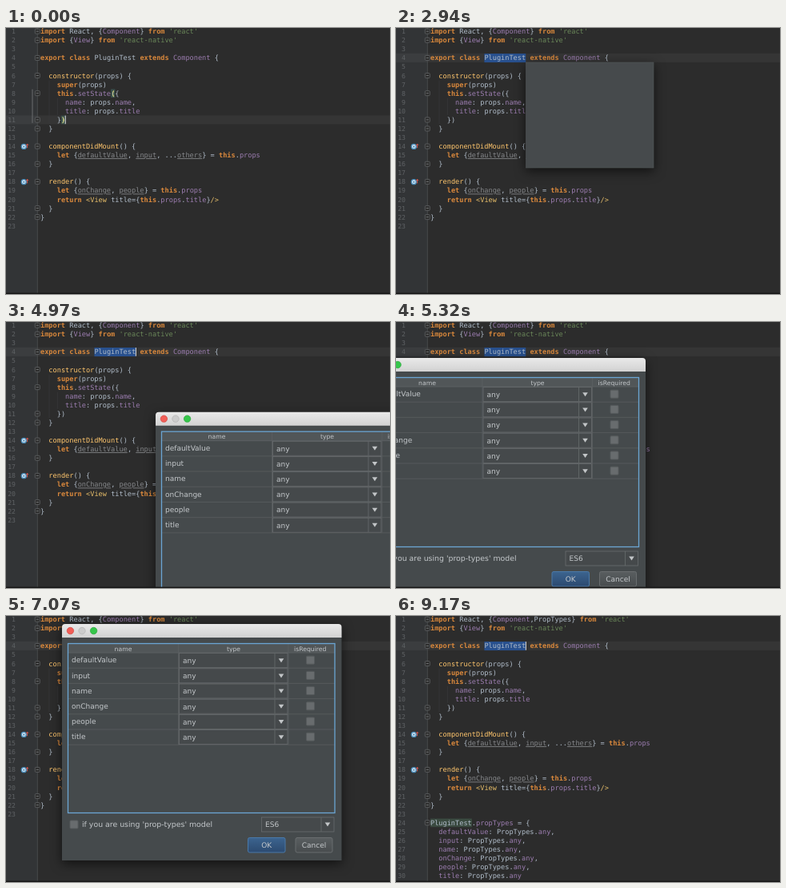
Animation of 480 by 333 pixels, one loop 9.24 s. Source, as an HTML page:

```html
<!DOCTYPE html>
<html lang="en">
<head>
<meta charset="utf-8">
<title>Editor plugin demo</title>
<style>
  html, body { margin: 0; width: 100%; height: 100%; overflow: hidden; background: #2c2c2c; }
  svg { display: block; width: 480px; height: 333px; }
  text { white-space: pre; text-rendering: geometricPrecision; }
  .code text { font: 8.61px "DejaVu Sans Mono", monospace; fill: #b0bcc9; }
  .code .num { font-size: 8.2px; fill: #5f6265; text-anchor: end; }
  .code .k { fill: #d9883c; font-weight: bold; }
  .code .p { fill: #9c7db0; }
  .code .f { fill: #ffc66d; }
  .code .s { fill: #6a8759; }
  .code .t { fill: #e8bf6a; }
  .code .u { fill: #85878a; text-decoration: underline; }
  .code .b { fill: #ffef28; font-weight: bold; }
  .ui text { font: 9px "DejaVu Sans", sans-serif; fill: #c3c7ca; }
  .ui .head { font-size: 7.7px; text-anchor: middle; }
  .ui .label { font-size: 9.37px; }
  .ui .btn { text-anchor: middle; }
  #popup, #dialog { filter: drop-shadow(0 4px 7px rgba(0, 0, 0, .6)); }
</style>
</head>
<body>
<svg id="stage" viewBox="0 0 480 333" xmlns="http://www.w3.org/2000/svg">
  <defs>
    <linearGradient id="bar" x2="0" y2="1"><stop stop-color="#e9e9e9"/><stop offset="1" stop-color="#d2d2d2"/></linearGradient>
    <linearGradient id="blue" x2="0" y2="1"><stop stop-color="#3c648f"/><stop offset="1" stop-color="#2c4a70"/></linearGradient>
    <linearGradient id="gray" x2="0" y2="1"><stop stop-color="#595e60"/><stop offset="1" stop-color="#484c4e"/></linearGradient>
  </defs>
</svg>
<script>
const LOOP = 9240, STEP = 70;
const CHAR = 5.185, LEFT = 43, LINE = 11.07;
const stage = document.getElementById('stage');
const midY = line => 4.2 + (line - 1) * LINE;
const colX = col => LEFT + col * CHAR;

function add(parent, tag, attrs, content) {
  const node = document.createElementNS('http://www.w3.org/2000/svg', tag);
  for (const key in attrs) node.setAttribute(key, attrs[key]);
  if (content !== undefined) node.textContent = content;
  return parent.appendChild(node);
}
const group = (parent, attrs = {}) => add(parent, 'g', attrs);
const rect = (parent, x, y, width, height, fill, more) =>
  add(parent, 'rect', { x, y, width, height, fill, ...more });
const path = (parent, d, stroke, more) =>
  add(parent, 'path', { d, stroke, fill: 'none', ...more });
const label = (parent, x, y, content, cls = '') =>
  add(parent, 'text', { x, y, class: cls }, content);
const show = (node, on) => { node.style.display = on ? '' : 'none'; };

// Code markup: [class|text] colours one token.
const tail = `[k|import] {[p|View]} [k|from] [s|'react-native']

[k|export class] PluginTest [k|extends] [p|Component] {

  [f|constructor](props) {
    [k|super](props)
    [k|this].[p|setState]({
      [p|name]: props.[p|name],
      [p|title]: props.[p|title]
    })
  }

  [f|componentDidMount]() {
    [k|let] {[u|defaultValue], [u|input], ...[u|others]} = [k|this].[p|props]
  }

  [f|render]() {
    [k|let] {[u|onChange], [u|people]} = [k|this].[p|props]
    [k|return] [t|<View] title={[k|this].[p|props].[p|title]}[t|/>]
  }
}
`.split('\n');
const firstLine = extra => `[k|import] React, {[p|Component]${extra}} [k|from] [s|'react']`;
const fields = ['defaultValue', 'input', 'name', 'onChange', 'people', 'title'];
const added = ['PluginTest.[p|propTypes] = {',
  ...fields.map((name, i) => `  [p|${name}]: PropTypes.[p|any]${i < 5 ? ',' : ''}`)];

function codeLine(parent, line, markup) {
  let col = 0;
  for (const [raw, cls, marked] of markup.matchAll(/\[(\w)\|(.*?)\]|[^\[]+/g)) {
    const content = marked ?? raw;
    const lead = content.length - content.trimStart().length;
    if (content.trim()) label(parent, colX(col + lead), midY(line) + 3, content.trim(), cls);
    col += content.length;
  }
}
function number(parent, line) {
  label(parent, 12, midY(line) + 3, line, 'num');
}
function fold(parent, line) {
  const y = midY(line);
  rect(parent, 36.3, y - 3, 6, 6, '#2c2c2c', { stroke: '#626567', 'stroke-width': .8, rx: 1 });
  path(parent, `M37.8 ${y}h3`, '#85888a', { 'stroke-width': .8 });
}
function overrideIcon(parent, line) {
  const y = midY(line);
  add(parent, 'circle', { cx: 22.3, cy: y + .3, r: 3, fill: '#d5e6f2', stroke: '#4a8fbd', 'stroke-width': 1.3 });
  add(parent, 'circle', { cx: 22.3, cy: y + .3, r: 1, fill: '#3b7ca8' });
  path(parent, `M26.6 ${y + 2}v-5m-1.5 1.7l1.5-1.7l1.5 1.7`, '#d4574e');
}

// Editor
const editor = group(stage, { class: 'code' });
rect(editor, 0, 0, 480, 333, '#2c2c2c');
rect(editor, 0, 0, 39, 333, '#323436');
const row = rect(editor, 0, 0, 480, LINE, '#fff', { 'fill-opacity': .045 });
path(editor, 'M39.3 0V333', '#505254', { 'stroke-width': .8 });
path(editor, `M54 ${midY(7) - 5}V${midY(11) + 5}M64.3 ${midY(9) - 5}V${midY(10) + 5}`, '#3a3c3d', { 'stroke-width': .7 });

const braces = group(editor);
path(braces, `M33 ${midY(8) - 5}V${midY(11) + 4}`, '#6a6d6f');
for (const [line, col] of [[8, 17], [11, 5]])
  rect(braces, colX(col), midY(line) - 5.2, CHAR, 10.6, '#3b514d');

const selection = rect(editor, colX(13), midY(4) - 5.4, 10 * CHAR, LINE, '#28508e');
const before = group(editor), after = group(editor);
codeLine(before, 1, firstLine(''));
codeLine(after, 1, firstLine(',PropTypes'));
number(editor, 1);
tail.forEach((markup, i) => {
  codeLine(editor, i + 2, markup);
  number(editor, i + 2);
});
[1, 2, 4, 6, 8, 11, 12, 14, 16, 18, 21, 22].forEach(line => fold(editor, line));
[14, 18].forEach(line => overrideIcon(editor, line));
label(braces, colX(17), midY(8) + 3, '(', 'b');
label(braces, colX(5), midY(11) + 3, ')', 'b');

rect(after, colX(0), midY(24) - 5.2, 10 * CHAR, 10.6, '#3a4a40');
added.forEach((markup, i) => {
  codeLine(after, 24 + i, markup);
  number(after, 24 + i);
});
fold(after, 24);
const caret = rect(editor, 0, 0, 1.1, 10.6, '#d0d0d0');

// Empty popup
const popup = group(stage, { id: 'popup' });
rect(popup, 162.5, 43, 159.5, 132, '#464a4c', { stroke: '#535759', 'stroke-width': .6 });

// Dialog, drawn from its own top left corner
const dialog = group(stage, { id: 'dialog', class: 'ui' });
rect(dialog, 0, 8, 349.5, 288, '#454a4c');
path(dialog, 'M0 17V4q0-4 4-4H345.5q4 0 4 4V17z', 'none', { style: 'fill:url(#bar)' });
[['#f25e57', '#cf4842'], ['#cccccc', '#b4b4b4'], ['#36c64b', '#2aa63b']].forEach(([fill, stroke], i) =>
  add(dialog, 'circle', { cx: 10.4 + i * 14.6, cy: 8.5, r: 4.2, fill, stroke, 'stroke-width': .7 }));

const form = group(dialog);
function combo(x, y, w, h, content) {
  rect(form, x, y, w, h, '#45494b', { stroke: '#686c6e', 'stroke-width': .8 });
  path(form, `M${x + w - 16} ${y}v${h}`, '#686c6e', { 'stroke-width': .8 });
  const cx = x + w - 8, cy = y + h / 2;
  path(form, `M${cx - 3.3} ${cy - 2.4}h6.6l-3.3 5z`, 'none', { style: 'fill:#c2c5c7' });
  label(form, x + 4.5, cy + 3.3, content);
}
const check = (x, y) => rect(form, x, y, 10, 10, '#686c6e', { stroke: '#565a5c', rx: 1 });
function button(x, w, fill, stroke, content) {
  rect(form, x, 267.5, w, 18.5, `url(#${fill})`, { stroke, rx: 2 });
  label(form, x + w / 2, 280, content, 'btn');
}

rect(form, 8, 25, 333, 11, '#515658');
label(form, 76.5, 33.7, 'name', 'head');
label(form, 214.5, 33.7, 'type', 'head');
label(form, 310.2, 33.7, 'isRequired', 'head');
path(form, 'M8 36H341', '#5f6466', { 'stroke-width': .8 });
fields.forEach((name, i) => {
  const y = 36 + i * 19.2;
  label(form, 12, y + 12.4, name);
  combo(146.5, y + .6, 135.5, 18, 'any');
  check(305.5, y + 4.2);
  path(form, `M8 ${y + 19.2}H341`, '#5c6062', { 'stroke-width': .7 });
});
path(form, 'M145.5 25V151.2M283 25V151.2', '#5c6062', { 'stroke-width': .8 });
rect(form, 7.5, 24.5, 333.5, 212, 'none', { stroke: '#6ba5d3', 'stroke-width': 1.3 });
check(10, 246);
label(form, 25, 254.3, "if you are using 'prop-types' model", 'label');
combo(249.5, 242, 90.5, 18, 'ES6');
button(232.5, 46.5, 'blue', '#4a79a8', 'OK');
button(292, 46, 'gray', '#696d6f', 'Cancel');

rect(stage, 0, 331.6, 480, 1.4, '#161616');

// [time, x, y]
const drag = [[4760, 333, 154], [5250, -38, 49], [5320, -37.5, 45], [5740, 88, 10],
  [5950, 88, 10], [6300, 70, 10]];

function dialogAt(t) {
  const next = drag.findIndex(key => key[0] > t);
  if (next < 1) return (next ? drag[drag.length - 1] : drag[0]).slice(1);
  const [t0, x0, y0] = drag[next - 1], [t1, x1, y1] = drag[next];
  const p = (t - t0) / (t1 - t0), e = p * p * (3 - 2 * p);
  return [x0 + (x1 - x0) * e, y0 + (y1 - y0) * e];
}

function render(t) {
  const selected = t >= 1120, inserted = t >= 7630;
  const line = selected ? 4 : 11;
  row.setAttribute('y', midY(line) - 5.5);
  caret.setAttribute('x', colX(selected ? 23 : 6) - .4);
  caret.setAttribute('y', midY(line) - 5.3);
  show(caret, Math.floor(t / 560) % 2 === 0);
  show(selection, selected);
  show(braces, !selected);
  show(before, !inserted);
  show(after, inserted);
  show(popup, t >= 1960 && t < 3150);
  show(dialog, t >= 3500 && t < 7560);
  show(form, t >= 3710);
  dialog.setAttribute('transform', `translate(${dialogAt(t)})`);
}

const start = performance.now();
function tick() {
  const t = (performance.now() - start) % LOOP;
  render(Math.floor(t / STEP) * STEP);
  requestAnimationFrame(tick);
}
tick();
</script>
</body>
</html>
```
